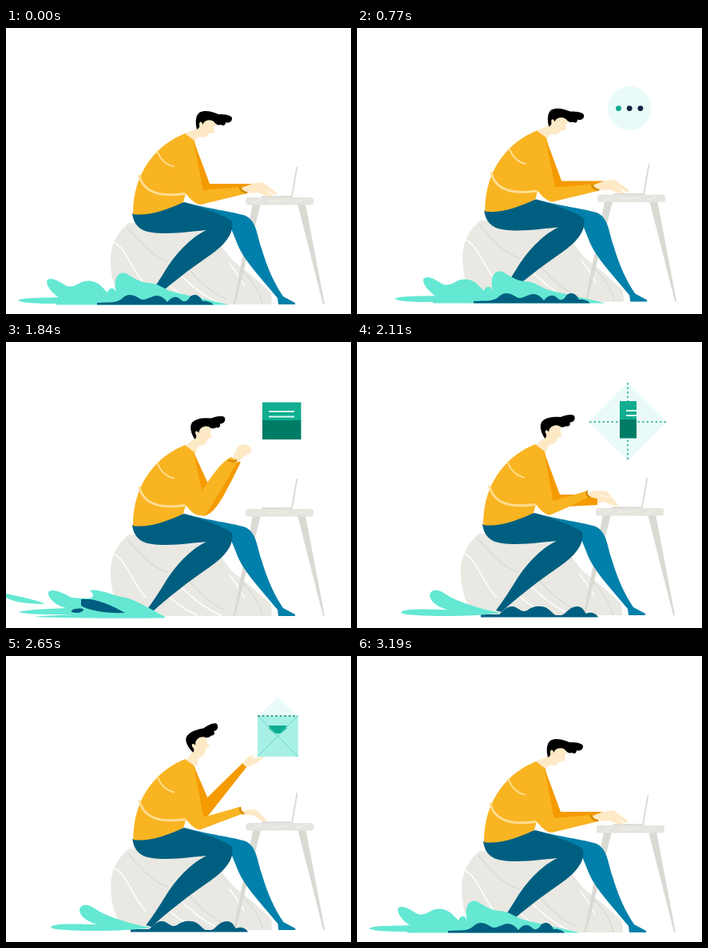
Animation of 432 by 358 pixels, one loop 4690 ms. Source, as an HTML page:

```html
<!DOCTYPE html>
<html lang="en">
<head>
<meta charset="utf-8">
<title>Writing a message</title>
<style>
  html, body { margin: 0; width: 100%; height: 100%; overflow: hidden; background: #fff; }
  svg { display: block; width: 100%; height: 100%; }
  [data-kind] { display: none; }
  [data-kind].on { display: inline; }
  .skin { fill: #fee9c6; }
  .yellow { fill: #f9b422; }
  .orange { fill: #f59a00; }
  .navy { fill: #005f80; }
  .blue { fill: #0080aa; }
  .sea { fill: #64e8d3; }
  .pale { fill: #e9faf9; }
  .mint { fill: #a7f0e6; }
  .green { fill: #10ad90; }
  .deep { fill: #007c66; }
  .stone { fill: #e9e8e2; }
  .leg { fill: #dadad4; }
  .line { fill: none; stroke-linecap: round; stroke-linejoin: round; }
  .cream { stroke: #ffdd91; }
  .cuff { stroke: #d38b08; stroke-width: 2.5; }
  .grey { stroke: #d9d9d4; }
  .white { stroke: #fff; }
  .ink { stroke: #dcf6ef; stroke-width: 2.2; stroke-linecap: butt; }
  .crease { stroke: #67d6c9; stroke-width: 1; }
  .dots { stroke: #22aa96; stroke-width: 1.5; stroke-dasharray: 2.5 3; stroke-linecap: butt; }
</style>
</head>
<body>
<svg viewBox="0 0 432 358" preserveAspectRatio="none">
  <g id="scene">
    <!-- rock -->
    <path class="stone" d="M153 240C140 250 129 267 130 290C131 317 140 336 150 342H332L331 328C318 315 300 300 283 287L250 246Z"/>
    <path class="line white" stroke-width="1.6" d="M135 265C151 274 155 297 174 319M204 290C220 309 242 330 268 341M194 309C208 324 223 334 238 341M279 291C287 301 292 309 297 318"/>
    <path class="line grey" stroke-width="1.2" d="M151 246C169 265 179 280 202 288M221 290C238 310 253 326 274 335M293 298C307 312 316 324 320 341"/>

    <!-- desk and laptop -->
    <path class="leg" d="M308 216H318L286 342H283.500ZM364 216H374L398 342H396Z"/>
    <rect class="stone" x="299" y="208" width="85" height="9.500" rx="3.500" style="fill:#e6e4de"/>
    <path class="line" stroke="#f4f3ef" d="M308 215L318 210M327 212C336 216 342 210 350 212M361 215L374 210"/>
    <path class="line grey" stroke-width="1.8" d="M320 207.200H357L363.200 171"/>

    <!-- legs -->
    <path class="blue" d="M222 214C250 222 284 226 299 231C313 238 313 255 319 272C326 296 335 316 346 332L361 340V342H340L339 334C315 305 295 285 287 262L278 240Z"/>
    <path class="navy" d="M222 214L157 228C159 242 166 250 182 252C205 255 235 250 250 249C234 256 214 275 200 297C192 310 183 324 174 336L181 338C200 320 230 297 255 280C272 268 285 254 282 238C276 232 250 222 222 214Z"/>

    <g id="head">
      <path class="skin" d="M222 128L240 121V114L247 109L261 112L262 117L259 121L260 127L253 128C250 133 246 134 242 132L238 134L234 140Z"/>
      <path d="M238 123C236 115 236 106 241 102C248 98 258 101 265 104C274 104 283 105 282 110C281 115 276 115 274 114C274 118 271 119 268 117C265 118 262 117 260 114C256 110 250 111 247 114L245 117C245 113 241 112 241 117C242 120 240 122 238 123Z"/>
    </g>

    <!-- sweater -->
    <path class="yellow" d="M223 128C190 141 158 174 158 229C178 232 202 223 221 214L224 203C228 208 233 214 239 216L247 200L235 137Z"/>
    <path class="line cream" stroke-width="2" d="M188.500 150C192 160 199 167 209 169.500"/>
    <path class="line cream" stroke-width="3" d="M166 181C171 201 190 208 222 203.500"/>

    <g data-kind="arms" id="type">
      <path class="orange" d="M234 137L254 191H308L293 198L246 201Z"/>
      <path class="yellow" d="M245 199L292 195L301 203L243 217Q237 218 224 203Z"/>
      <path class="skin" d="M294 196L307 191L320 189L339 203L336 205L322 198L334 206L328 207L314 202L301 203Z"/>
      <path class="line cuff" d="M292 196Q293 201 300 202"/>
    </g>
    <g data-kind="arms" id="tap">
      <path class="orange" d="M234 137L254 191H288L302 196L301 204L262 206L246 201Z"/>
      <path class="skin" d="M288 189L299 186L313 187L328 205L319 204L309 200L301 202V196L292 194Z"/>
      <path class="line" stroke="#fff" stroke-width=".8" d="M306 192L322 196"/>
      <path class="yellow" d="M245 199L286 187L291 194C281 199 264 207 243 216Q237 219 224 203Z"/>
      <path class="line cuff" d="M288 187Q286 191 291 194"/>
    </g>
    <g data-kind="arms" id="clasp">
      <path class="orange" d="M234 137L252 176L245 190ZM293 149C283 170 272 192 264 203Q255 216 245 217L280 148Z"/>
      <path class="yellow" d="M244 186C254 170 269 148 281 143L289 148C278 168 262 195 250 214Q241 222 224 203Z"/>
      <path class="skin" d="M283 143L290 129L299 127L306 131V137L299 141L288 150Z"/>
      <path class="line cuff" stroke-width="4" d="M278 147Q284 150 287 147"/>
    </g>
    <g data-kind="arms" id="give">
      <path class="skin" d="M294 135L302 125L310 123L306 128L324 124L313 132L299 139Z"/>
      <path class="orange" d="M234 137L251 176L295 133Q297 137 300 138L251 200L246 201Z"/>
      <path class="skin" d="M290 192L311 191L326 205L320 206L308 198L294 198Z"/>
      <path class="yellow" d="M245 201L291 188L296 196L243 216Q237 218 224 203Z"/>
      <path class="line cuff" d="M292 189Q291 194 296 196"/>
    </g>

    <g id="icons">
      <circle class="pale" data-kind="icon" id="seed" cx="339" cy="98" r="11"/>
      <g data-kind="icon" id="bubble">
        <circle class="pale" cx="339" cy="100" r="27.500"/>
        <circle class="dot" cx="325.300" cy="100" r="3.400"/>
        <circle class="dot" cx="339" cy="100" r="3.400"/>
        <circle class="dot" cx="352.700" cy="100" r="3.400"/>
      </g>
      <g data-kind="icon" id="card">
        <path class="green" d="M320 74.500H368.500V98H320Z"/>
        <path class="deep" d="M320 97H368.500V121H320Z"/>
        <path class="line ink" d="M328 86H360M328 92.500H360"/>
      </g>
      <g data-kind="icon" id="fold">
        <path class="pale" d="M339 51L388 100L339 149L290 100Z"/>
        <path class="line dots" d="M291 100H388M339 51V149"/>
        <path class="green" d="M329 74H350V98H329Z"/>
        <path class="deep" d="M329 97H350V120.500H329Z"/>
        <path class="line ink" d="M337 86H350M337 92H350"/>
      </g>
      <g data-kind="icon" id="wrap">
        <path class="pale" d="M339 51L364.500 74V124L339 149L313.700 124V74Z"/>
        <path class="mint" d="M313.700 74L339 99L313.700 125ZM364.500 74L339 99L364.500 125Z"/>
        <path class="green" d="M328 86H350V98H328Z"/>
        <path class="deep" d="M328 97H350V110H328Z"/>
        <path class="line dots" d="M314 74H364M314 125H364"/>
      </g>
      <g data-kind="icon" id="envelope">
        <path class="pale" d="M313.700 74L339 51L364.500 74Z"/>
        <path class="mint" d="M313.700 74H364.500V125H313.700Z"/>
        <path class="green" d="M328 86H350V90L343 96H335L328 90Z"/>
        <path class="line crease" d="M314 74L339 99L364 74M314 125L339 99L364 125"/>
        <path class="line dots" style="stroke:#087c6c" d="M314 74H364"/>
      </g>
      <g data-kind="icon" id="sealed">
        <path class="mint" d="M313.700 74H364.500V125H313.700Z"/>
        <path class="pale" d="M313.700 74H364.500L339 99Z"/>
        <path class="line crease" d="M314 74L339 99L364 74M314 125L339 99L364 125"/>
      </g>
    </g>
  </g>

  <g id="water">
    <g data-kind="wave" id="swell">
      <path class="sea" d="M15 341C22 337 45 338 66 337C58 332 51 324 51 317C53 311 64 315 74 322C80 325 86 323 91 320C100 314 112 316 119 323L127 331C130 324 135 324 138 331C134 314 140 304 150 307C159 312 166 318 178 319C192 320 196 326 208 330C232 336 258 341 279 346.500H63V345C45 345 22 345 15 341Z"/>
      <path class="navy" d="M114 346.500V344C130 343 140 345 147 337C154 331 162 335 168 339C172 342 178 338 184 336C192 333 198 338 202 343C207 336 214 334 220 341C224 344 228 341 230 337C236 331 243 335 246 342C252 341 258 344 260 346.500Z"/>
    </g>
    <g data-kind="wave" id="crest">
      <path class="sea" d="M28 347V345C43 343 47 338 52 328C57 316 68 312 79 321L91 331C94 325 99 325 101 330C100 312 108 305 117 308C130 318 150 321 165 328C190 336 218 341 245 347Z"/>
      <path class="navy" d="M61 347C75 345 85 344 93 339C103 334 115 332 123 334C126 337 124 340 123 343C130 340 138 341 141 343C143 346 140 347 137 347Z"/>
    </g>
    <g data-kind="wave" id="splash">
      <path class="sea" d="M0 315C15 318 35 322 49 328C30 328 10 326 0 320ZM53 313C58 308 70 313 82 320L98 321C110 322 112 317 105 311C115 308 135 318 150 320C165 324 180 334 199 344V345.500C150 346 80 346 36 344C50 342 70 342 85 341C60 341 30 342 16 338C30 334 60 334 75 333C62 330 52 320 53 313Z"/>
      <path class="navy" d="M94 322C110 320 130 328 149 339C125 340 103 336 94 330ZM82 336C87 333 96 333 97 335C96 339 88 340 82 338Z"/>
    </g>
    <g data-kind="wave" id="ripple">
      <path class="navy" d="M155 344.500V341H178C182 338 186 332 193 331C202 330 204 340 213 336C222 329 233 330 239 334C245 338 246 342 250 342H256C262 341 264 332 275 331C284 331 285 339 287 340C293 337 300 340 302 344.500Z"/>
      <path class="sea" d="M91 317C92 309 102 309 110 315C125 325 150 333 180 339C150 344 90 344 62 341C50 339 56 336 66 335C85 334 100 335 113 335C100 331 92 325 91 317Z"/>
    </g>
  </g>
</svg>
<script>
  const LOOP = 4690;
  // start, scene x/y, head tilt, arms, wave, wave x/y, icon, lit dots
  const poses = [
    [0, 1, 4, 0, "type", "swell", 0, 0, ""],
    [230, 1, 3, 0, "type", "swell", 32, 2, "seed"],
    [500, 1, 1, 0, "type", "swell", 32, 0, "bubble", 0],
    [770, 2.2, .6, 0, "type", "swell", 32, -2, "bubble", 1],
    [1040, 1, 0, 0, "type", "swell", 31, -2, "bubble", 2],
    [1310, 0, 0, 0, "type", "crest", 0, 0, "bubble", 3],
    [1580, 1, 0, 0, "type", "crest", 10, -1, "card"],
    [1840, 1, 1, -18, "clasp", "splash", 0, 0, "card"],
    [2110, 0, 0, -19, "tap", "ripple", 0, 0, "fold"],
    [2380, 1, 0, -19, "tap", "ripple", -15, 0, "wrap"],
    [2650, 1.3, 1, -32, "give", "ripple", 1, 1, "envelope"],
    [2920, 1, 2, -32, "give", "swell", 0, 0, "sealed"],
    [3190, 1, 4, 0, "type", "swell", 0, 0, ""]
  ];
  const byId = id => document.getElementById(id);
  const parts = document.querySelectorAll("[data-kind]");
  const dots = document.querySelectorAll(".dot");
  const start = performance.now();
  let current;

  function show([, x, y, tilt, arms, wave, wx, wy, icon, lit]) {
    const active = [arms, wave, icon];
    parts.forEach(part => part.classList.toggle("on", active.includes(part.id)));
    dots.forEach((dot, i) => dot.setAttribute("fill", i < lit ? "#0da98d" : "#10233f"));
    byId("scene").setAttribute("transform", `translate(${x} ${y})`);
    byId("water").setAttribute("transform", `translate(${wx} ${wy})`);
    byId("head").setAttribute("transform", `rotate(${tilt} 230 130)`);
    byId("icons").setAttribute("transform", `translate(0 ${icon === "sealed" ? -66 : 0})`);
  }

  function tick(now) {
    const time = Math.max(0, now - start) % LOOP;
    const pose = poses.findLast(p => p[0] <= time);
    if (pose !== current) show(current = pose);
    requestAnimationFrame(tick);
  }
  tick(start);
</script>
</body>
</html>
```
